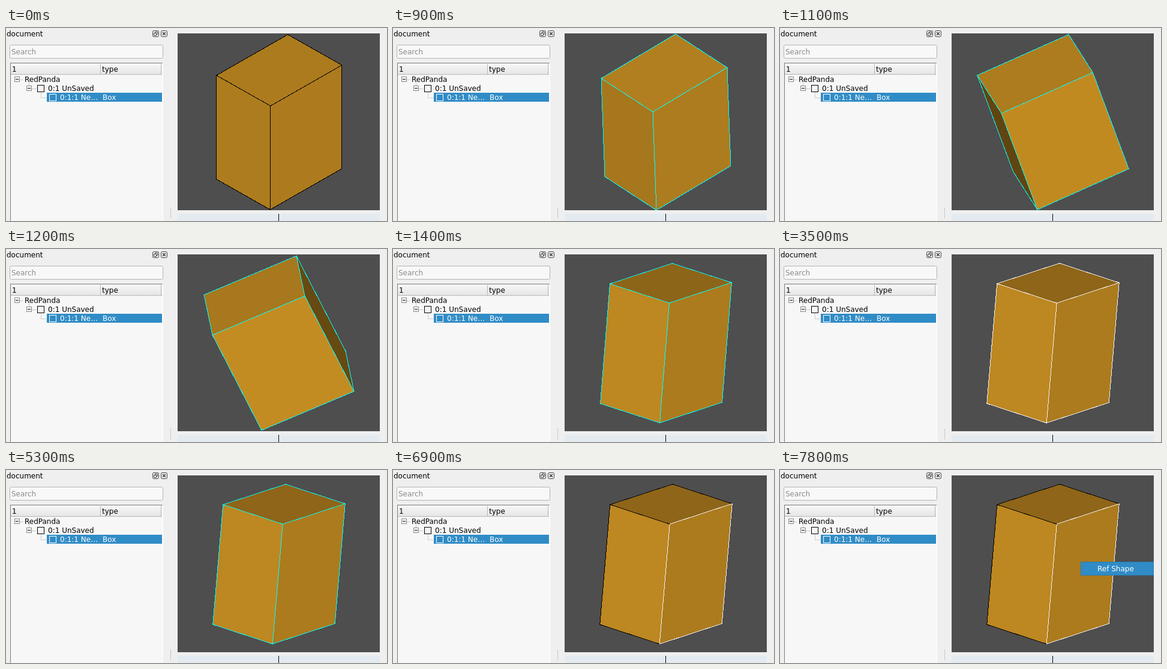
Animation of 635 by 322 pixels, one loop 8 s. Source, as an HTML page:

```html
<!DOCTYPE html>
<html lang="en">
<head>
<meta charset="utf-8">
<title>Box selection</title>
<style>
  html, body { margin: 0; width: 100%; height: 100%; overflow: hidden; background: #efefef; }
  svg { display: block; }
  text { font: 12px "DejaVu Sans", sans-serif; fill: #000; white-space: pre; }
  .crisp { shape-rendering: crispEdges; }
  .line { fill: none; stroke: #000; }
  .dots { fill: none; stroke: #a0a0a0; stroke-dasharray: 1 1; }
  .light { fill: #fff; }
</style>
</head>
<body>
<svg width="635" height="322" viewBox="0 0 635 322">
  <defs>
    <linearGradient id="head" x2="0" y2="1">
      <stop offset="0" stop-color="#f7f7f7"/><stop offset="1" stop-color="#e6e6e6"/>
    </linearGradient>
    <clipPath id="view"><rect x="286" y="9" width="337" height="295"/></clipPath>
  </defs>
  <rect width="635" height="322" fill="#efefef"/>

  <text x="1" y="14">document</text>
  <g class="line" stroke-width="1" style="stroke:#444">
    <rect x="244.5" y="4.5" width="10" height="10" rx="2"/>
    <path d="M248.500 8.500v-2h4v4h-2M246.500 8.500h4v4h-4z"/>
    <rect x="258.500" y="4.500" width="10" height="10" rx="2"/>
    <path d="M261 7l5 5m0-5l-5 5" stroke-width="1.600"/>
  </g>

  <rect x="6.500" y="28.500" width="255" height="22" rx="2" fill="#f8f8f8" stroke="#b4b4b4"/>
  <text x="9" y="44" style="fill:#8a8a8a">Search</text>

  <g class="crisp">
    <rect x="7" y="58" width="254" height="264" fill="#f7f7f7"/>
    <rect x="8" y="59" width="252" height="18" fill="url(#head)"/>
    <path class="line" style="stroke:#b8b8b8" d="M8 77.500H260M157.500 60V77M258.500 60V77"/>
    <path class="line" style="stroke:#7c7c7c" d="M7.500 322V58.500H261"/>
    <path class="line" style="stroke:#fff" d="M261.500 58V322"/>
    <rect x="68" y="108" width="192" height="15" fill="#308cc6"/>
    <path class="dots" d="M23 86.500H29M38.500 91V96M43 101.500H50M58.500 108V116M58 116.500H67"/>
    <g class="line" style="stroke:#8a8a8a">
      <rect x="14.500" y="81.500" width="8" height="8"/>
      <rect x="34.500" y="96.500" width="8" height="8"/>
    </g>
    <path class="line" d="M16 85.500H21M36 100.500H41M52.500 95.500h11v11h-11z"/>
    <path class="line" style="stroke:#fff" d="M72.500 110.500h11v11h-11z"/>
    <path class="dots" d="M274.500 300V318"/>
  </g>
  <text x="10" y="73">1</text>
  <text x="160" y="73">type</text>
  <text x="31" y="90">RedPanda</text>
  <text x="70" y="105">0:1 UnSaved</text>
  <text x="90" y="120" class="light">0:1:1 Ne…</text>
  <text x="161" y="120" class="light">Box</text>

  <g class="crisp">
    <rect x="286" y="9" width="337" height="295" fill="#4e4e4e"/>
    <rect x="286" y="310" width="337" height="12" fill="#e4ebf0"/>
    <rect x="454" y="310" width="1" height="12"/>
    <g id="box" clip-path="url(#view)"></g>
  </g>
  <g id="menu">
    <rect x="501.500" y="153.500" width="121" height="22" fill="#308cc6" stroke="#2a7cb0"/>
    <text x="529" y="169" class="light">Ref Shape</text>
  </g>
</svg>
<script>
const LOOP = 8000;
const CENTER = [455, 157];
const SIZE = [127, 168.6, 211.3];
const BLACK = '#000', CYAN = '#00ffff', WHITE = '#f0f0f0';
const RIGHT = 0, LEFT = 1;

// Projected box axes per pose: screen x of each axis, then screen y.
const poses = [
  { t: 0,    x: [-90, 119, -0.5],  y: [-51, -68, 173] },
  { t: 900,  x: [-86, 124, 6],     y: [-56, -74, 164] },
  { t: 1200, x: [-14, 154, 82],    y: [-67, -65, 159] },
  { t: 1400, x: [-99, 104, -16],   y: [-32, -34, 200] },
  { t: 1500, x: [-99.5, 104, -17], y: [-32.5, -34, 200] }
];

// Edge colour of the whole box, optionally with one face outlined differently.
const states = [
  { t: 0, edge: BLACK },
  { t: 500, edge: CYAN },
  { t: 1500, edge: WHITE },
  { t: 1700, edge: WHITE, face: RIGHT, mark: CYAN },
  { t: 2100, edge: WHITE, face: LEFT, mark: CYAN },
  { t: 2400, edge: WHITE, face: RIGHT, mark: CYAN },
  { t: 3100, edge: WHITE },
  { t: 4500, edge: CYAN },
  { t: 6000, edge: WHITE },
  { t: 6900, edge: BLACK, face: RIGHT, mark: WHITE }
];

const box = document.getElementById('box');
const menu = document.getElementById('menu');
const lastIndex = (list, t) => list.findLastIndex(item => item.t <= t);
const mix = (a, b, k) => a + (b - a) * k;
const unit = row => row.map((n, i) => n / SIZE[i]);

// Blend two rows of a rotation while keeping their length.
function turn(a, b, k) {
  const p = unit(a), q = unit(b);
  const row = p.map((n, i) => mix(n, q[i], k));
  const scale = mix(Math.hypot(...p), Math.hypot(...q), k) / Math.hypot(...row);
  return row.map(n => n * scale);
}

function poseAt(t) {
  const i = lastIndex(poses, t), a = poses[i], b = poses[i + 1];
  const k = b && t > 900 ? (t - a.t) / (b.t - a.t) : 0;
  const to = b || a;
  return { x: turn(a.x, to.x, k), y: turn(a.y, to.y, k) };
}

function shade(facing) {
  const level = Math.abs(facing) ** 0.33;
  return `rgb(${[207, 148, 36].map(c => Math.round(c * level))})`;
}

function boxFaces({ x, y }) {
  const depth = [0, 1, 2].map(i => {
    const j = (i + 1) % 3, k = (i + 2) % 3;
    return x[j] * y[k] - x[k] * y[j];
  });
  // Axes flipped so that all of them leave the corner nearest to the viewer.
  const axes = depth.map((d, i) => [x, y].map(row => row[i] * SIZE[i] * (d < 0 ? -1 : 1)));
  const near = CENTER.map((c, n) => c - (axes[0][n] + axes[1][n] + axes[2][n]) / 2);
  const add = (p, q) => [p[0] + q[0], p[1] + q[1]];
  return depth.map((d, i) => {
    const a = axes[(i + 1) % 3], b = axes[(i + 2) % 3];
    const corners = [near, add(near, a), add(add(near, a), b), add(near, b)];
    return {
      fill: shade(d),
      points: corners.map(p => p.map(n => n.toFixed(2)).join()).join(' ')
    };
  });
}

function render(time) {
  const t = Math.floor(time % LOOP / 100) * 100;
  const state = states[lastIndex(states, t)];
  const faces = boxFaces(poseAt(t));
  const polygon = (face, fill, stroke) =>
    `<polygon points="${face.points}" fill="${fill}" stroke="${stroke}"/>`;
  let shapes = faces.map(f => polygon(f, f.fill, 'none')).join('');
  shapes += faces.map(f => polygon(f, 'none', state.edge)).join('');
  if (state.mark) shapes += polygon(faces[state.face], 'none', state.mark);
  box.innerHTML = shapes;
  menu.style.display = t >= 7800 ? '' : 'none';
}

const start = performance.now();
function tick() {
  render(performance.now() - start);
  requestAnimationFrame(tick);
}
tick();
</script>
</body>
</html>
```
